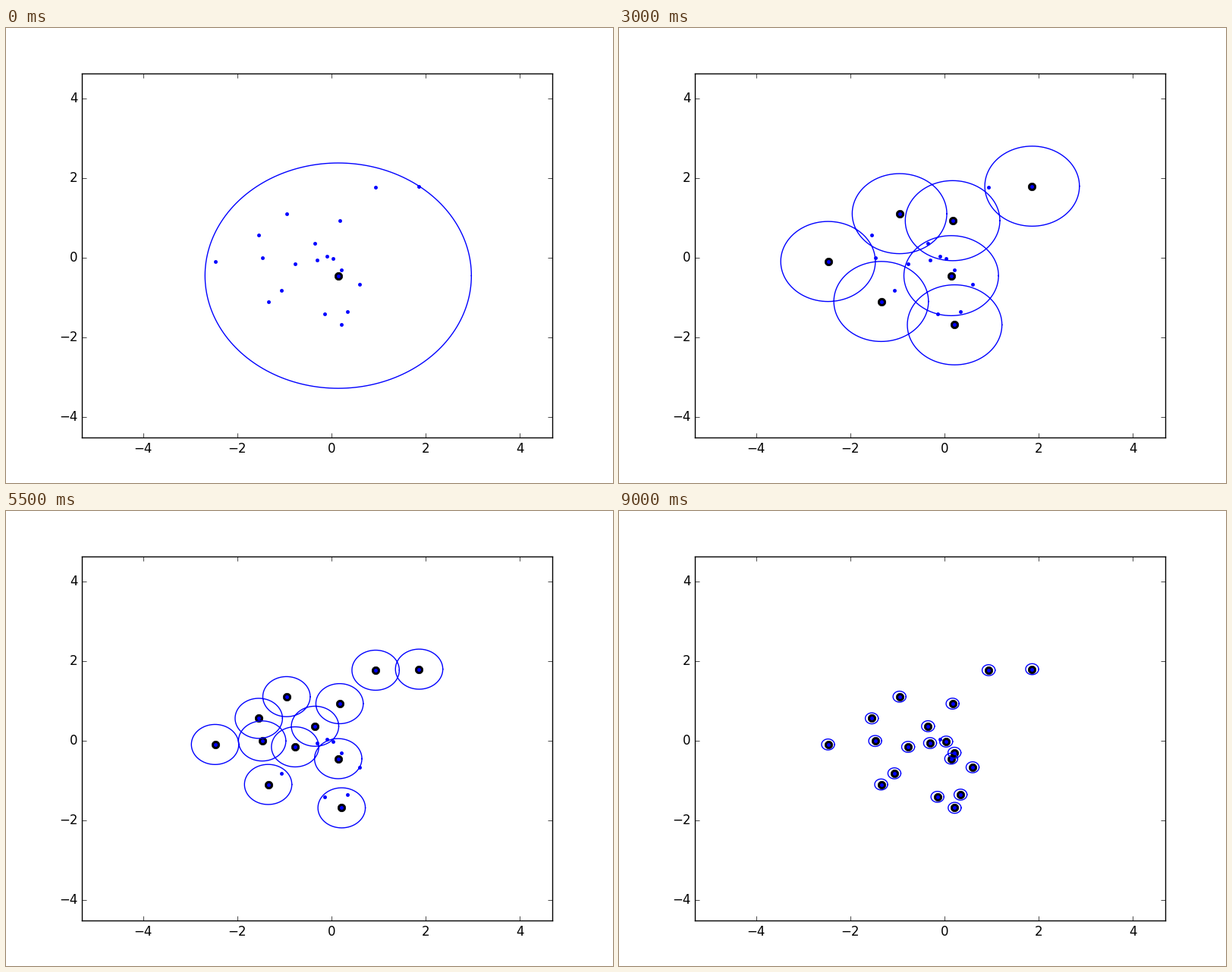
Animation of 800 by 600 pixels, one loop 9500 ms. Source, as a matplotlib script:

```python
import numpy as np
import matplotlib.pyplot as plt
from matplotlib.animation import FuncAnimation

plt.style.use("classic")
plt.rcParams.update({
    "font.family": "DejaVu Sans",
    "figure.facecolor": "white",
    "savefig.facecolor": "white",
    "figure.dpi": 100,
    "savefig.dpi": 100,
})

STEPS = 19
STEP_MS = 500

# The scattered sample; everything else is derived from it.
POINTS = np.array([
    (0.142, -0.451), (0.937, 1.770), (1.861, 1.796), (-0.956, 1.106),
    (0.171, 0.930), (-1.545, 0.561), (-1.473, -0.007), (-0.350, 0.363),
    (-2.474, -0.095), (-0.773, -0.155), (-0.307, -0.060), (-0.090, 0.036),
    (0.035, -0.022), (0.211, -0.302), (0.596, -0.668), (-1.065, -0.820),
    (-1.346, -1.099), (-0.150, -1.409), (0.340, -1.354), (0.215, -1.686),
])


def farthest_first(points, steps):
    """Greedy k-center: the picking order and the covering radius per step."""
    order, radii = [0], []
    gap = np.hypot(*(points - points[0]).T)
    for _ in range(steps):
        pick = int(gap.argmax())
        radii.append(gap[pick])
        order.append(pick)
        gap = np.minimum(gap, np.hypot(*(points - points[pick]).T))
    return order, radii


ORDER, RADII = farthest_first(POINTS, STEPS)
ANGLE = np.linspace(0, 2 * np.pi, 201)
# The trailing NaN separates one circle from the next.
UNIT = np.vstack([np.column_stack([np.cos(ANGLE), np.sin(ANGLE)]),
                  [np.nan, np.nan]])

fig = plt.figure(figsize=(8, 6), dpi=100)
ax = fig.add_axes([0.125, 0.1, 0.775, 0.8])
low, high = POINTS.min(axis=0) - RADII[0], POINTS.max(axis=0) + RADII[0]
ax.set_xlim(low[0], high[0])
ax.set_ylim(low[1], high[1])
ax.set_xticks(range(-4, 5, 2))
ax.set_yticks(range(-4, 5, 2))

centers, = ax.plot([], [], "k.", markersize=15)
ax.plot(*POINTS.T, "b.", markersize=6, scalex=False, scaley=False)
circles, = ax.plot([], [], "b-", linewidth=1)


def draw(step):
    chosen = POINTS[ORDER[:step + 1]]
    rings = chosen[:, None, :] + RADII[step] * UNIT
    centers.set_data(*chosen.T)
    circles.set_data(*rings.reshape(-1, 2).T)
    return centers, circles


anim = FuncAnimation(fig, draw, frames=STEPS, interval=STEP_MS,
                     repeat=True, repeat_delay=0)
plt.show()
```
